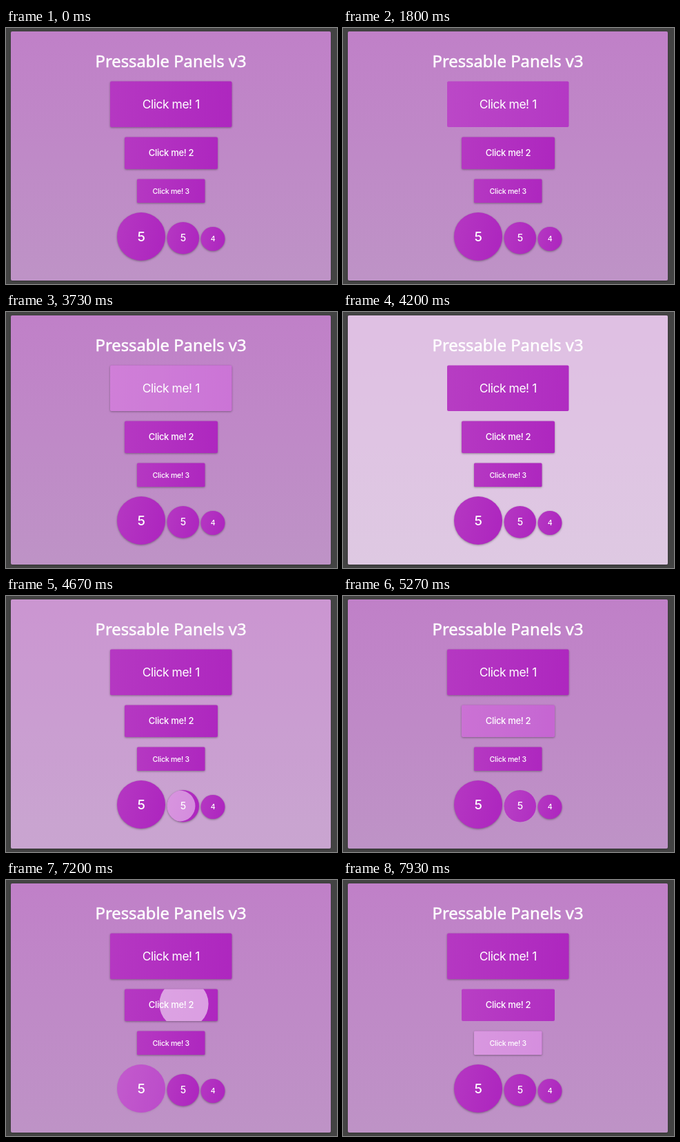
Recreate the animation shown at these times as an HTML page with a canvas. Size 480 by 372 pixels, loop 8000 ms.

```html
<!DOCTYPE html>
<html lang="en">
<head>
<meta charset="utf-8">
<title>Ripple buttons</title>
<style>
  html, body { margin: 0; height: 100%; overflow: hidden; background: #434343; }
  canvas { display: block; width: 480px; height: 372px; }
</style>
</head>
<body>
<canvas id="stage"></canvas>
<script>
const LOOP = 8000, FADE = 850, GROW = 600;
const canvas = document.getElementById('stage');
const ratio = window.devicePixelRatio || 1;
canvas.width = 480 * ratio;
canvas.height = 372 * ratio;
const ctx = canvas.getContext('2d');

// Clicks: [time, x, y, final radius]
const card = {
  x: 7, y: 5, w: 464, h: 362, radius: 2,
  clicks: [[4060, 300, 250, 1050]]
};
const buttons = [
  { x: 151, y: 77.5, w: 176.5, h: 66.5, radius: 2, label: 'Click me! 1', size: 17.4, weight: 400,
    clicks: [[1060, 230, 110, 220], [2260, 240, 110, 220], [3385, 250, 110, 220]] },
  { x: 172, y: 158.5, w: 135, h: 46.5, radius: 2, label: 'Click me! 2', size: 13, weight: 500,
    clicks: [[4830, 225, 181, 160], [7130, 258, 180, 160]] },
  { x: 190, y: 219.5, w: 98.5, h: 34.5, radius: 1.5, label: 'Click me! 3', size: 10.6, weight: 500,
    clicks: [[7760, 240, 237, 125]] },
  { x: 161, y: 268, w: 70, h: 70, radius: 35, label: '5', size: 19, weight: 500,
    clicks: [[6600, 196, 303, 50]] },
  { x: 233.5, y: 282, w: 46.5, h: 46.5, radius: 23.25, label: '5', size: 14, weight: 500,
    clicks: [[4480, 252, 305, 42], [5590, 252, 305, 42]] },
  { x: 282.5, y: 289, w: 35, h: 35, radius: 17.5, label: '4', size: 10.5, weight: 500,
    clicks: [[5980, 286, 309, 28]] }
];

const clamp = v => Math.max(0, Math.min(1, v));

function gradient(x0, y0, x1, y1, from, to) {
  const fill = ctx.createLinearGradient(x0, y0, x1, y1);
  fill.addColorStop(0, from);
  fill.addColorStop(1, to);
  return fill;
}

function drawSurface(box, fill, shadow, time) {
  ctx.save();
  ctx.beginPath();
  ctx.roundRect(box.x, box.y, box.w, box.h, box.radius);
  ctx.shadowColor = `rgba(0, 0, 0, ${shadow})`;
  ctx.shadowBlur = 3 * ratio;
  ctx.shadowOffsetY = ratio;
  ctx.fillStyle = fill;
  ctx.fill();
  ctx.shadowColor = 'transparent';
  ctx.clip();
  for (const [start, x, y, radius] of box.clicks) {
    const age = time - start;
    if (age < 0 || age > FADE) continue;
    const growth = 1 - (1 - clamp(age / GROW)) ** 2;
    ctx.fillStyle = `rgba(255, 255, 255, ${0.6 * (1 - age / FADE)})`;
    ctx.beginPath();
    ctx.arc(x, y, radius * growth, 0, Math.PI * 2);
    ctx.fill();
  }
  ctx.restore();
}

// The shadow sinks as a ripple fades, then returns.
function shadowAt(box, time) {
  let strength = 0.35;
  for (const [start] of box.clicks) {
    const age = time - start;
    const sunk = clamp((age - 450) / 200) * clamp((1000 - age) / 150);
    strength *= 1 - sunk;
  }
  return strength;
}

function drawTitle() {
  ctx.font = '500 23.8px "Noto Sans", sans-serif';
  ctx.letterSpacing = '0px';
  ctx.fillStyle = ctx.strokeStyle = '#fff';
  ctx.lineWidth = 0.5;
  ctx.fillText('Pressable Panels v3', 239, 57);
  ctx.strokeText('Pressable Panels v3', 239, 57);
}

function drawLabel({ x, y, w, h, label, size, weight }) {
  ctx.font = `${weight} ${size}px Inter, sans-serif`;
  ctx.letterSpacing = `${-0.025 * size}px`;
  ctx.fillStyle = '#fff';
  ctx.fillText(label, x + w / 2, y + h / 2 + size * 0.355);
}

function draw(time) {
  ctx.setTransform(ratio, 0, 0, ratio, 0, 0);
  ctx.textAlign = 'center';
  ctx.fillStyle = '#434343';
  ctx.fillRect(0, 0, 480, 372);
  drawSurface(card, gradient(0, 5, 0, 367, '#c080c8', '#be93c6'), 0.2, time);
  drawTitle();
  for (const b of buttons) {
    const fill = gradient(b.x, b.y, b.x + b.w, b.y + b.h / 4, '#b538c2', '#ae27bf');
    drawSurface(b, fill, shadowAt(b, time), time);
    drawLabel(b);
  }
}

const origin = performance.now();
function tick() {
  draw((performance.now() - origin) % LOOP);
  requestAnimationFrame(tick);
}
tick();
</script>
</body>
</html>
```
